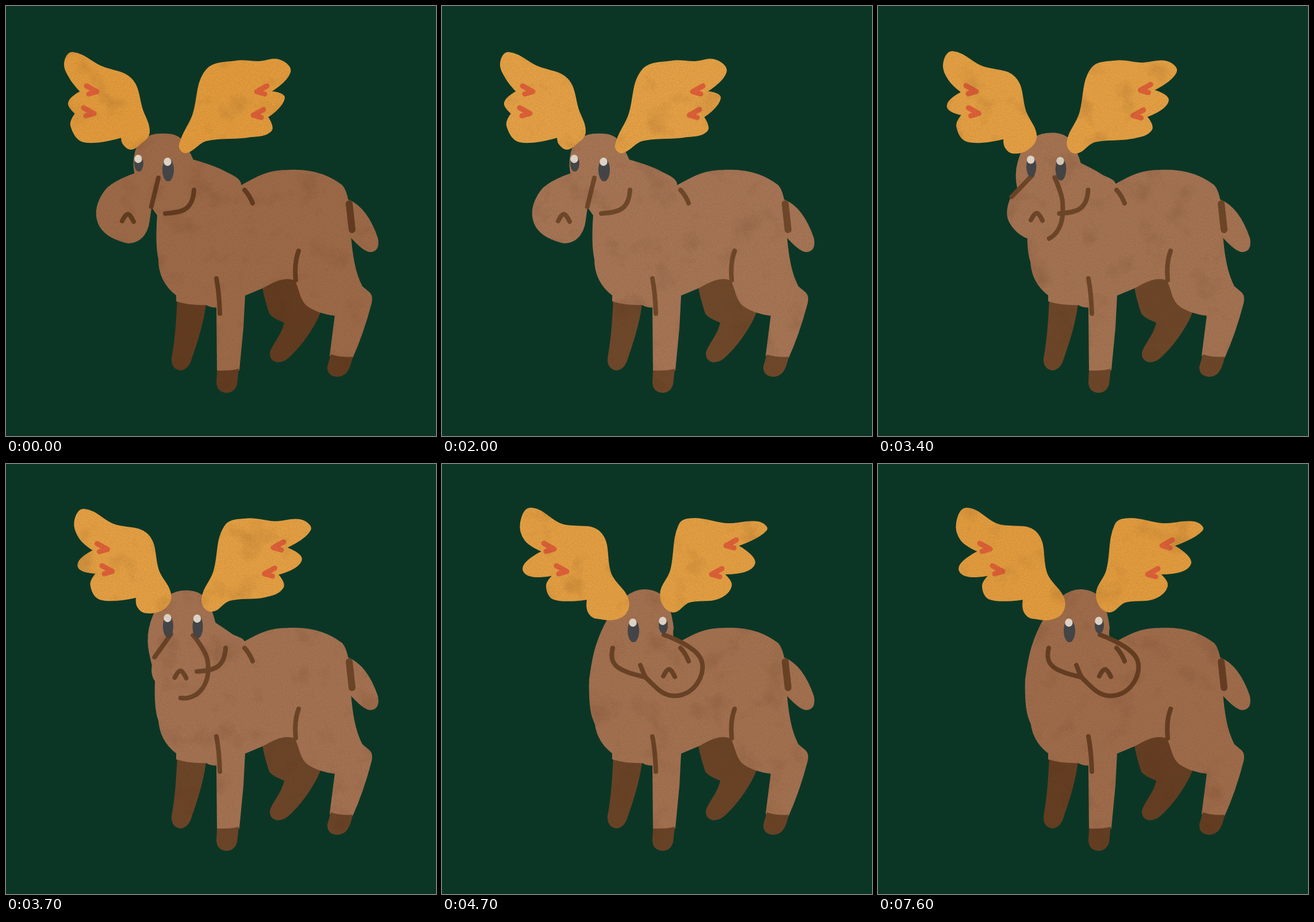
Write an HTML page that moves like this. It is 748 px wide and 748 px high and loops after 8000 ms.

```html
<!DOCTYPE html>
<html lang="en">
<head>
<meta charset="utf-8">
<title>Moose</title>
<style>
  html, body { margin: 0; height: 100%; overflow: hidden; background: #0b3626; }
  svg { display: block; width: 100vw; height: 100vh; }
  .fur { fill: var(--fur); stroke: var(--fur); stroke-width: 2; }
  .dark { fill: var(--dark); }
  .antler { fill: var(--antler); stroke: var(--antler); stroke-width: 2; }
  .line, .mark { fill: none; stroke: var(--dark); stroke-width: 8; stroke-linecap: round; stroke-linejoin: round; }
  .mark { stroke: #df6139; stroke-width: 9; }
  .eye { fill: #45474a; }
  .shine { fill: #e3dacd; }
</style>
</head>
<body>
<svg viewBox="0 0 748 748" xmlns="http://www.w3.org/2000/svg">
  <defs>
    <filter id="paper" filterUnits="userSpaceOnUse" x="0" y="0" width="748" height="748" color-interpolation-filters="sRGB">
      <feTurbulence class="noise" type="fractalNoise" baseFrequency=".55" numOctaves="2"/>
      <feColorMatrix values="0 0 0 0 .15  0 0 0 0 .07  0 0 0 0 .02  .25 0 0 0 -.09" result="grain"/>
      <feTurbulence class="noise" type="fractalNoise" baseFrequency=".02" numOctaves="5"/>
      <feColorMatrix values="0 0 0 0 .3  0 0 0 0 .15  0 0 0 0 .05  .4 0 0 0 -.22" result="stain"/>
      <feMerge result="texture"><feMergeNode in="grain"/><feMergeNode in="stain"/></feMerge>
      <feComposite in="texture" in2="SourceAlpha" operator="in" result="inside"/>
      <feMerge><feMergeNode in="SourceGraphic"/><feMergeNode in="inside"/></feMerge>
    </filter>
  </defs>
  <g filter="url(#paper)">
    <path class="dark" d="M298 508L348 519C343 555 333 585 324 611Q318 633 303 634Q287 631 288 613C294 580 296 550 298 508Z"/>
    <path class="dark" d="M446 490C455 474 490 466 506 474L530 510 548 530C540 555 515 590 497 607Q485 620 472 620Q458 617 459 603C465 585 478 575 484 551C470 545 462 541 458 535Q450 512 446 490Z"/>
    <path class="fur" d="M596 338C620 348 636 375 646 404Q650 426 634 427Q622 427 597 398Z"/>
    <path class="fur" d="M403 316C430 302 450 286 490 286C540 283 568 300 584 312C600 330 597 380 600 410C604 450 610 470 619 488L632 499Q638 505 635 517C625 555 612 590 602 612L564 608 573 538C555 536 535 530 523 520C510 508 510 484 502 476C480 469 460 483 446 490L415 503 412 560 405 633 368 635 367 523Q358 525 348 519Q320 520 297 513V503C280 490 266 470 266 440L270 400 330 320Z"/>
    <path class="dark" d="M367 634Q390 635 405 631L402 658Q398 672 384 673Q367 672 366 655Z"/>
    <path class="dark" d="M565 606Q585 612 603 610C598 636 590 645 575 645Q558 643 559 627Z"/>
    <g id="front"></g>
    <path class="line" style="stroke-width:12" d="M597 344L602 389"/>
    <path class="line" d="M415 320Q424 330 429 343"/>
    <path class="line" d="M509 426Q501 447 504 477"/>
    <path class="line" d="M366 474Q371 500 372 535"/>
  </g>
</svg>
<script>
const svg = document.querySelector('svg');
const front = document.getElementById('front');
const lerp = (a, b, t) => a + (b - a) * t;
const clamp = v => Math.max(0, Math.min(1, v));

// Key points of an outline: facing left > facing right, "!" marks a corner.
const outline = text => text.trim().split(/\s+/).map(p => ({
  left: p.split('>')[0].split(',').map(Number),
  right: p.split('>')[1].split(',').map(parseFloat),
  corner: p.endsWith('!')
}));

const head = outline(`350,450>350,450! 408,314>420,312 380,288>403,303 325,268>402,285! 304,232>388,236
  281,223>355,219 245,229>320,231 225,255>290,268 227,300>268,318 264,364>257,375! 266,440>262,440 297,503>297,503!`);
const muzzle = outline(`265,299>386,297! 253,348>448,335 240,398>443,383 208,411>400,403
  161,378>357,374 172,322>345,350 224,292>350,300!`);
const leftAntler = outline(`102,99>137,102 116,81>155,77 165,105>208,105 218,127>275,119 237,180>294,192
  249,220>324,237 233,240>312,266 217,249>268,268 204,240>254,256 201,228>253,235! 135,236>195,235
  113,208>182,212 121,187>194,193! 109,168>142,186 130,149>175,152! 111,125>145,133`);
const rightAntler = outline(`302,242>380,228 313,255>400,257 348,234>430,240 420,228>480,234 461,217>503,212
  455,193>490,191! 484,160>543,175 460,149>514,142! 494,115>564,115 475,94>550,101 440,97>495,104
  400,96>440,95 348,112>413,105 325,190>398,185`);

// Curve through the points; handles follow the line between the neighbours.
function smooth(points, turn, closed = true) {
  const n = points.length;
  const spots = points.map(p => p.left.map((v, k) => lerp(v, p.right[k], turn)));
  const index = i => closed ? (i + n) % n : Math.max(0, Math.min(n - 1, i));
  const at = i => spots[index(i)];
  const gap = (a, b) => Math.hypot(b[0] - a[0], b[1] - a[1]);
  const handle = (i, sign) => {
    if (points[index(i)].corner) return at(i);
    const before = at(i - 1), after = at(i + 1);
    const reach = sign * .36 * gap(at(i), at(i + sign)) / gap(before, after);
    return at(i).map((v, k) => v + (after[k] - before[k]) * reach);
  };
  let d = 'M' + spots[0];
  for (let i = 0; i < (closed ? n : n - 1); i++) d += `C${handle(i, 1)} ${handle(i + 1, -1)} ${at(i + 1)}`;
  return closed ? d + 'Z' : d;
}

const path = (name, d, more = '') => `<path class="${name}" d="${d}" ${more}/>`;
const oval = (name, x, y, rx, ry) => `<ellipse class="${name}" cx="${x}" cy="${y}" rx="${rx}" ry="${ry}"/>`;
const slide = (x, y) => `transform="translate(${x} ${y})"`;

// The eye on the far side of the head is shorter.
function eye(x, y, near) {
  const ry = Math.min(20, 14 + 12 * near);
  return oval('eye', x, y, lerp(8, 10, near), ry) + oval('shine', x - 1, y + 6 - ry, 6.7, 7.2);
}

const chevron = (x, y, side) =>
  path('mark', `M${side * 18} -10L0 0L${side * 14} 4`, slide(x, y));

function drawFront(turn) {
  const at = (from, to) => lerp(from, to, turn);
  front.innerHTML = [
    path('fur', smooth(head, turn)),
    path('fur', smooth(muzzle, turn)),
    path('line', smooth(muzzle.slice(0, 6), turn, false),
      `pathLength="1" stroke-dasharray="${at(.2, 1)} 2"`),
    turn > .3 && turn < .9 ? path('line', smooth(muzzle.slice(5), turn, false)) : '',
    turn < .7
      ? path('line', 'M277 361C305 359 325 356 327 320', slide(turn * 110, 0))
      : path('line', 'M297 320C288 355 315 361 354 371', slide((turn - 1) * 110, 0)),
    path('line', 'M-9 7Q-3 -5 1 -5T11 8', slide(at(211, 394), at(367, 362))),
    eye(at(231, 333), at(274, 290), turn),
    eye(at(282, 385), at(285, 281), 1 - turn),
    path('antler', smooth(leftAntler, turn)),
    path('antler', smooth(rightAntler, turn)),
    chevron(at(158, 195), at(149, 148), -1),
    chevron(at(153, 217), 187, -1),
    chevron(at(436, 494), at(149, 142), 1),
    chevron(at(430, 469), at(190, 192), 1)
  ].join('');
}

const LOOP = 8000;
const stepStart = step => Math.round((330.5 * step + 47) / 100) * 100;
const mix = (a, b, t) => `rgb(${a.map((v, i) => Math.round(lerp(v, b[i], t)))})`;

let shown = -1;
function draw() {
  const time = performance.now() % LOOP;
  let step = 0;
  while (stepStart(step + 1) <= time) step++;
  if (step !== shown) {
    shown = step;
    const start = stepStart(step);
    const light = start < 2000 ? start / 2000 : 1 - (start - 2000) / 7000;
    svg.style.setProperty('--fur', mix([158, 107, 73], [167, 118, 86], light));
    svg.style.setProperty('--dark', mix([100, 61, 33], [112, 73, 43], light));
    svg.style.setProperty('--antler', mix([228, 156, 61], [230, 162, 70], light));
    document.querySelectorAll('.noise').forEach((n, i) => n.setAttribute('seed', step * 2 + i + 1));
    drawFront(clamp((start - 2700) / 2000));
  }
  requestAnimationFrame(draw);
}
draw();
</script>
</body>
</html>
```
